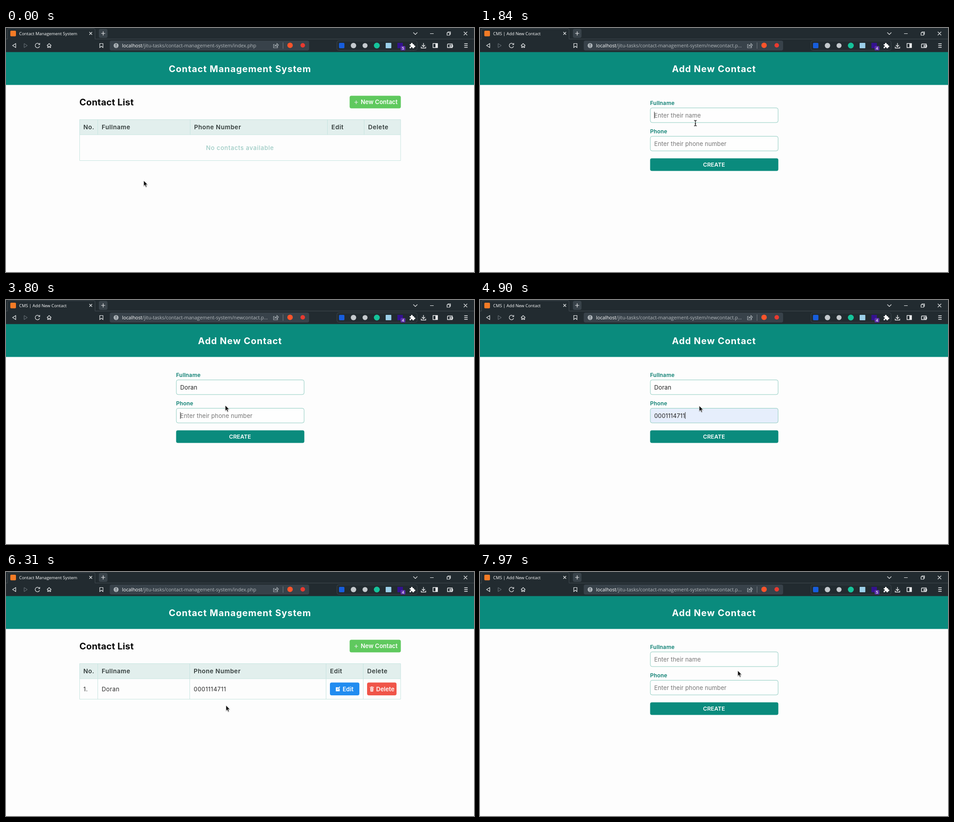
Animation, 1033 px wide and 542 px high, one loop 8 s. Source, as an HTML page:

```html
<!DOCTYPE html>
<html lang="en">
<head>
<meta charset="utf-8">
<title>Contact Management System</title>
<style>
  html, body { margin: 0; width: 100%; height: 100%; overflow: hidden; background: #fdfdfd; }
  svg { display: block; width: 1033px; height: 542px; font: 400 13px Inter, sans-serif; letter-spacing: .13px; }
  .ui { font: 10.7px "Open Sans", sans-serif; letter-spacing: 0; fill: #b3b9bd; }
  .tab { font-size: 9.4px; font-weight: 500; fill: #fff; }
  .line { fill: none; stroke: #eef0f1; stroke-width: 1.2; }
  .title { font-size: 20px; font-weight: 700; letter-spacing: 1px; fill: #fff; text-anchor: middle; }
  .h2 { font-size: 20px; font-weight: 700; letter-spacing: .2px; fill: #0a0a0a; }
  .th { font-size: 13.5px; font-weight: 600; letter-spacing: .55px; fill: #323b3a; }
  .td { letter-spacing: .5px; fill: #2a2a2a; }
  .none { font-size: 13.2px; font-weight: 500; letter-spacing: .7px; fill: #9ccbc4; text-anchor: middle; }
  .btn { font-weight: 600; letter-spacing: 0; fill: #fff; }
  .label { font-size: 12px; font-weight: 600; letter-spacing: .2px; fill: #0b7f72; }
  .input { fill: #fefefe; stroke: #8ccabf; }
  .grid { fill: none; stroke: #c6e4e0; }
</style>
</head>
<body>
<svg viewBox="0 0 1033 542">
  <rect width="1033" height="542" fill="#fdfdfd"/>

  <!-- browser -->
  <rect width="1033" height="54" fill="#222b30"/>
  <path d="M0 24.5H3.5V4Q3.5 1.5 6 1.5H194Q196.5 1.5 196.5 4V24.5H1033" fill="none" stroke="#414a50"/>
  <rect x="9.500" y="6" width="12.500" height="12.500" rx="2" fill="#f37b26"/>
  <text id="tab" class="ui tab" x="29" y="15.500"></text>
  <rect x="205" y="2" width="19" height="20" rx="4" fill="#39434a"/>
  <path class="line" d="M184 9l6 6m0-6l-6 6M214.500 7.500v9M210 12h9M899 10l4.500 4.500 4.500-4.500M936 12.500h8M1010.500 8.500l7.500 7.500m0-7.500l-7.500 7.500M975.500 10V8.500h5.500V14H979.500M973.500 10.500h6v5.500h-6z"/>
  <path class="line" d="M21.500 34.500v9l-7-4.500zM73.500 36a5 5 0 1 0 .7 4.500M74.500 33.500v3.500h-3.500M90.500 39l4.700-4.500 4.700 4.500M92 38.500v5h2v-3h2.500v3h2v-5M207 34.500h7v9l-3.500-3-3.500 3z"/>
  <path d="M40 34.500v9l7-4.500z" fill="none" stroke="#737c82"/>
  <rect x="229" y="28" width="440" height="22" rx="4" fill="#38424a"/>
  <circle cx="243" cy="39" r="5.500" fill="#a9b0b5"/>
  <path d="M243 35.500v4M243 41v1.500" stroke="#38424a" stroke-width="1.500"/>
  <text class="ui" x="256" y="43"><tspan fill="#fff">localhost</tspan><tspan id="path"></tspan></text>
  <path class="line" style="stroke:#a9b0b5" d="M593 36.500h-2.500v7.500h9v-2.500M593 41q1-4 5-4v-2.500l3.500 3.500-3.500 3.500v-2.500q-3 0-5 2"/>
  <path d="M611.500 32v14" stroke="#737c82"/>
  <circle cx="627" cy="38.500" r="6" fill="#fb542b"/>
  <circle cx="655" cy="38.500" r="5" fill="#e83a30"/>
  <rect x="730.500" y="28.500" width="177" height="21" rx="4" fill="none" stroke="#3c464c"/>
  <rect x="735" y="33" width="12" height="12" rx="2" fill="#175ddc"/>
  <circle cx="767" cy="39" r="6" fill="#c4c9cd"/>
  <circle cx="792.500" cy="39" r="5.500" fill="#c4c9cd"/>
  <circle cx="818.500" cy="39" r="6.500" fill="#15c39a"/>
  <rect x="838" y="33" width="12.500" height="12" rx="1" fill="#9bcfe9"/>
  <rect x="864" y="33" width="12" height="12" fill="#34128f"/>
  <rect x="871" y="40" width="10.500" height="10" rx="2" fill="#5b2fa8"/>
  <text id="badge" class="ui" style="font-size:8px;font-weight:600;fill:#fff" x="874" y="48"></text>
  <path d="M891 36h3a2 2 0 1 1 3.500 0h3v3a2 2 0 1 1 0 3.500v2.500h-3.300a1.800 1.800 0 1 0-3.300 0H891v-3.300a1.800 1.800 0 1 0 0-3.300z" fill="#fff"/>
  <path class="line" style="stroke-width:1.400" d="M921.500 33.500v7.500M918 38l3.500 3.500 3.500-3.500M916.500 41.500v3h10v-3M942.500 34.500h10v9h-10zM974.500 36.500v7h10.500v-8h-9.500q-1 0-1 1zM980 38.500h6v3h-6zM1011.500 35h7.500M1011.500 39h7.500M1011.500 43h7.500"/>
  <path d="M948 35h4v8h-4z" fill="#fff"/>

  <!-- page header -->
  <rect y="53.500" width="1033" height="73" fill="#0a8b7d"/>
  <text id="title" class="title" x="516.500" y="97.500"></text>

  <g id="list">
    <text class="h2" x="162" y="171.500">Contact List</text>
    <rect id="add" x="758.500" y="150.500" width="113" height="28" rx="4"/>
    <path class="line" d="M773 161v8M769 165h8"/>
    <text class="btn" x="783" y="169">New Contact</text>
    <g id="table"></g>
  </g>

  <g id="form">
    <text class="label" x="375.500" y="171">Fullname</text>
    <rect class="input" x="376" y="177.500" width="282" height="32.500" rx="4"/>
    <text id="name" x="384.500" y="198.500"></text>
    <text class="label" x="375.500" y="234">Phone</text>
    <rect id="phoneBox" class="input" x="376" y="240.500" width="282" height="32.500" rx="4"/>
    <text id="phone" x="384.500" y="261.500"></text>
    <rect id="caret" width="1" height="15" fill="#222"/>
    <rect id="create" x="375.500" y="289.500" width="283" height="28" rx="4"/>
    <text class="btn" style="font-size:12.400px" text-anchor="middle" x="516.500" y="308">CREATE</text>
  </g>

  <g id="mouse" style="filter:drop-shadow(.5px 1px .6px #0006)">
    <path id="arrow" d="M0 0V12l2.700-2.400 1.900 4.300 2.100-.9-1.900-4.200H8.500z" fill="#0a0a0a" stroke="#fff" stroke-width=".8"/>
    <path id="hand" d="M-1.200 1Q0-1 1.200 1V5Q2.500 4 3.500 5.300 4.800 4.600 5.800 6 7.700 5.500 7.800 7.500V10L6.500 12V14H-.5V12.500L-4 8.500Q-4 6.500-2 7.500L-.8 8.800z" fill="#fff" stroke="#111"/>
    <path id="beam" d="M-3-6Q0-6 0-4.500 0-6 3-6M0-4.500V4.500M-3 6Q0 6 0 4.500 0 6 3 6M-1.500 1.500h3" fill="none" stroke="#222" stroke-width="1.200"/>
  </g>
</svg>
<script>
const $ = id => document.getElementById(id);
const show = (id, on) => $(id).style.display = on ? '' : 'none';
const put = (id, text) => { if ($(id).textContent !== text) $(id).textContent = text; };

const LOOP = 8000, NAME = 'Doran', PHONE = '0001114711';
const OPEN = 1150, SAVED = 6250, REOPEN = 7650;
const FOCUS_NAME = 1720, TYPE_NAME = 2400, FOCUS_PHONE = 3620, TYPE_PHONE = 4250, FILL = 4850;

// pointer stops: time, x, y
const STOPS = [
  [0, 304, 339], [90, 304, 339], [640, 783, 178], [730, 788, 174], [880, 788, 173],
  [1300, 620, 300], [1680, 474, 200], [1840, 475.5, 211], [3150, 475.5, 211],
  [3500, 482, 254], [3640, 482, 254], [3800, 484, 234], [4850, 484, 234],
  [5500, 479, 298], [6250, 479, 298], [6900, 788, 214], [7110, 793.5, 208],
  [7300, 790, 172], [7480, 790, 172], [7970, 569, 219], [8000, 568, 219]
];

function pointer(t) {
  const i = STOPS.findIndex(s => s[0] > t);
  const [t0, x0, y0] = STOPS[i - 1], [t1, x1, y1] = STOPS[i];
  const k = (1 - Math.cos(Math.PI * (t - t0) / (t1 - t0))) / 2;
  return [x0 + (x1 - x0) * k, y0 + (y1 - y0) * k];
}

function table(filled) {
  const cols = filled ? [202.5, 405.5, 706.5, 788.5] : [202.5, 406.5, 709.5, 790.5];
  const bottom = filled ? 283 : 295;
  const heads = ['No.', 'Fullname', 'Phone Number', 'Edit', 'Delete'];
  const text = (cls, s, x, y) => `<text class="${cls}" x="${x}" y="${y}">${s}</text>`;
  const lefts = [162, ...cols].map(x => x + 8.7);
  let out = '<rect x="162" y="203" width="709" height="34" fill="#e2efed"/>' +
    `<path class="grid" d="M162.500 203.500H871V${bottom - .5}H162.500zM162.500 237H871` +
    cols.map(x => `M${x} 203V${filled ? bottom : 237}`).join('') + '"/>' +
    heads.map((s, i) => text('th', s, lefts[i], 225)).join('');
  if (!filled) return out + text('none', 'No contacts available', 516.5, 271);
  return out + ['1.', NAME, PHONE].map((s, i) => text('td', s, lefts[i], 264.5)).join('') +
    '<rect x="715" y="245.500" width="65" height="28.500" rx="4" fill="#218cf0"/>' +
    '<rect x="797" y="245.500" width="65" height="28.500" rx="4" fill="#f05549"/>' +
    '<path d="M728 256h6l-3 3v2.500l2.500-.5 3-3v7H728z" fill="#fff"/><path d="M732 260l5-5" stroke="#fff" stroke-width="2"/>' +
    '<path d="M804 258h7l-.6 7.500h-5.800zM803 255.500h9v1.500h-9zM806 254.500h3v1h-3z" fill="#fff"/>' +
    '<path d="M806 259.500v4.500M807.500 259.500v4.500M809 259.500v4.500" stroke="#f05549" stroke-width=".6"/>' +
    text('btn', 'Edit', 743, 264.5) + text('btn', 'Delete', 817, 264.5);
}

function field(id, value, hint) {
  put(id, value || hint);
  $(id).style.fill = value ? '#222' : '#757575';
}

const typed = (s, t, start, step) => s.slice(0, Math.max(0, Math.floor((t - start) / step) + 1));
let wasFilled;

function draw(t) {
  const list = t < OPEN || (t >= SAVED && t < REOPEN);
  const filled = t >= SAVED, again = t >= REOPEN;
  if (filled !== wasFilled) $('table').innerHTML = table(wasFilled = filled);
  show('list', list);
  show('form', !list);
  put('tab', list ? 'Contact Management System' : 'CMS | Add New Contact');
  put('title', list ? 'Contact Management System' : 'Add New Contact');
  put('path', '/jitu-tasks/contact-management-system/' + (list ? 'index.php' : 'newcontact.p...'));
  put('badge', t > 1500 && t < 6600 ? '4' : '5');

  const name = again ? '' : typed(NAME, t, TYPE_NAME, 160);
  const phone = again ? '' : t >= FILL ? PHONE : typed(PHONE.slice(0, 3), t, TYPE_PHONE, 150);
  field('name', name, 'Enter their name');
  field('phone', phone, 'Enter their phone number');
  $('phoneBox').style.fill = phone === PHONE ? '#e6eefc' : '';

  const onPhone = t >= FOCUS_PHONE;
  const since = [FOCUS_NAME, TYPE_NAME + 640, FOCUS_PHONE, TYPE_PHONE + 300, FILL].filter(s => s <= t).pop();
  const typing = (t > TYPE_NAME && t < TYPE_NAME + 640) || (t > TYPE_PHONE && t < TYPE_PHONE + 300);
  show('caret', since && !again && (typing || (t - since) % 1000 < 500));
  const active = onPhone ? phone : name;
  const width = active && !list ? $(onPhone ? 'phone' : 'name').getComputedTextLength() : 0;
  $('caret').setAttribute('x', 384.5 + width);
  $('caret').setAttribute('y', onPhone ? 249 : 186);

  const [x, y] = pointer(t);
  const over = (l, top, r, b) => x >= l && x <= r && y >= top && y <= b;
  const onAdd = list && over(758, 150, 872, 179);
  const onCreate = !list && over(375, 289, 659, 318);
  const onInput = !list && (over(375, 177, 659, 212) || over(375, 240, 659, 273));
  $('add').style.fill = onAdd ? '#4cba4b' : '#5fc95e';
  $('create').style.fill = onCreate ? '#0a7f72' : '#0a8b7d';
  show('hand', onAdd || onCreate);
  show('beam', onInput);
  show('arrow', !onAdd && !onCreate && !onInput);
  $('mouse').setAttribute('transform', `translate(${x} ${y})`);
}

const start = performance.now();
function frame() {
  draw((performance.now() - start) % LOOP);
  requestAnimationFrame(frame);
}
frame();
</script>
</body>
</html>
```
